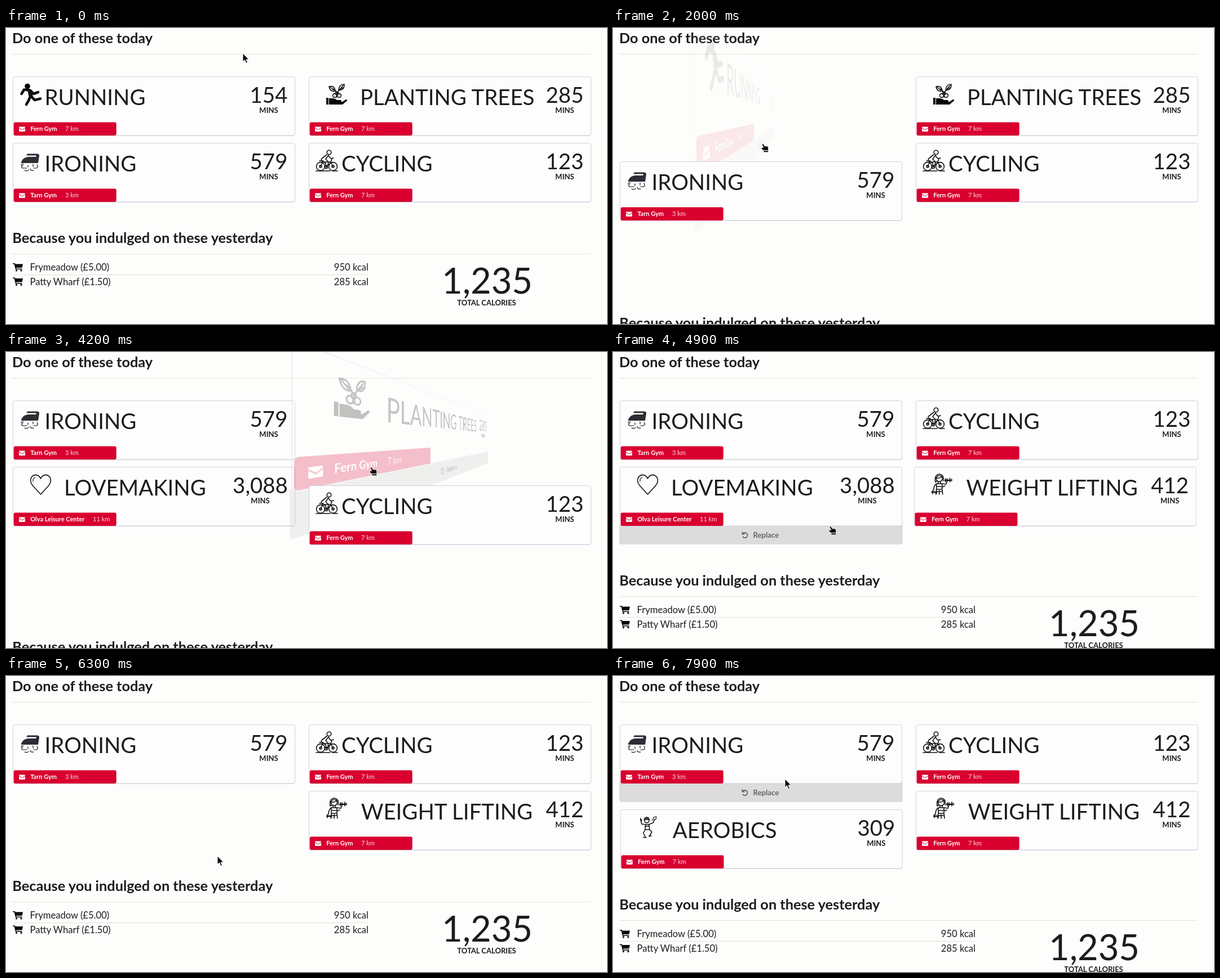
An HTML page for the animation above (8 s loop, 1066 by 526 pixels).

```html
<!DOCTYPE html>
<html lang="en">
<head>
<meta charset="utf-8">
<title>Activities</title>
<style>
html, body { margin: 0; width: 100%; height: 100%; overflow: hidden; background: #fdfdfc; }
#stage { position: absolute; left: 0; top: 0; width: 1066px; height: 526px; overflow: hidden; }
svg { position: absolute; overflow: visible; font-family: Lato, sans-serif; fill: #1b1c1d; }
.card { width: 501px; height: 138px; transform-origin: 250.5px 69px; }
.bold { font-weight: 700; }
.mid { text-anchor: middle; }
.h { font-size: 25.3px; font-weight: 700; }
.big { font-size: 38.4px; }
.row { font-size: 16.6px; }
.label { font-size: 13px; font-weight: 700; text-anchor: middle; }
.rule { stroke: #e2e2d8; }
.ink { fill: none; stroke: #111; stroke-width: 1.6; stroke-linecap: round; stroke-linejoin: round; }
.thin { stroke-width: 1.2; }
.limb { stroke-width: 4.6; }
.solid { fill: #050505; }
</style>
</head>
<body>
<div id="stage">
  <svg width="1066" height="60">
    <text class="h" x="11" y="27">Do one of these today</text>
    <path class="rule" d="M12 46.5H1037"/>
  </svg>
  <svg id="food" width="1066" height="526">
    <text class="h" x="11.3" y="382">Because you indulged on these yesterday</text>
    <path class="rule" d="M12 401.5H1037M12 438.5H643"/>
    <text class="mid" x="853.5" y="472" font-size="63.2">1,235</text>
    <text class="label" x="852.5" y="493">TOTAL CALORIES</text>
  </svg>
</div>
<script>
const LOOP = 8000, FLIP = 750, ENTER = 1000;
const TOP = 86, PITCH = 117.5, BUTTON = 33;
const stage = document.getElementById('stage');
const food = document.getElementById('food');

const icons = {
  run: `<circle class="solid" cx="26" cy="17.5" r="4.8"/>
    <g class="ink limb">
      <path d="M30 26L32 35" style="stroke-width:7"/>
      <path d="M29 24.5L20 23.5L15.5 31M31 25L37 31L45 28"/>
      <path d="M33 36L39 42L49 39.500M31 36L28 43L24 50"/></g>`,
  iron: `<path fill="#2d2d35" fill-rule="evenodd"
      d="M15 34Q18 26 27 25H41L42 22.5H24L26 19.5H43Q47 19.5 47 23L45 36H15Z"/>
    <path class="ink thin" d="M15 40Q15 37 19 38M17 45Q14 42 18 40M18 45H25M27 40V43M36 38V42M43 39Q46 43 42 45H37M21 49Q26 51 28 48M31 46Q31 50 37 49"/>`,
  plant: `<path class="ink" d="M50 37V31Q49 25 43 22M50 31Q52 24 61 20M36 18Q46 16 47 26Q38 28 36 18ZM63 14Q54 14 53 24Q63 26 63 14Z"/>
    <path class="ink" d="M38 19L45 25M61 16L55 23"/>
    <g class="ink"><circle cx="46" cy="34" r="3.4"/><circle cx="54" cy="34" r="3.4"/><circle cx="50" cy="30" r="2.6"/></g>
    <path class="solid" d="M31 38H35V50H31ZM36 39H43Q47 39 50 42H57Q59 44 57 45H60L66 41Q69 41 68 43L60 50H36Z"/>`,
  cycle: `<g class="ink"><circle cx="21" cy="42" r="7.4"/><circle cx="43" cy="42" r="7.4"/><circle cx="36" cy="17" r="3.8"/>
      <circle cx="31" cy="43" r="2.5"/><circle cx="21" cy="42" r="2"/><circle cx="43" cy="42" r="2"/>
      <path d="M32 21L23 28Q21 31 24 33L30 36L31 43M35 22L30 29L35 34L33 43M35 23L39 28L44 27M21 42L25 34H39L43 42M39 34L41 29M31 43L39 35M19 32H26M13 50H38M42 50H51"/></g>`,
  heart: `<path class="ink" d="M49.500 49L35 33Q29 25 33.500 18Q38 13 44 15Q48 17 49.500 21Q51 17 55 15Q61 13 65.500 18Q70 25 64 33Z"/>
    <path class="ink thin" d="M36 26Q35 20 40 19"/>`,
  lift: `<g class="ink"><circle cx="45" cy="21" r="5.5"/>
      <path d="M38 27Q36 14 45 13Q54 14 52 25M39 20Q46 21 50 17M38 27L41 25M43 27V30M47 27V30"/>
      <path d="M40 30H50L57 31L59 25M50 30V40H40V30Q35 33 35 42M40 35H50M55 34L50 36M40 40L39 49M45 42V49M50 40L51 49M40 44H50"/>
      <path d="M55 24H65M32 45H40" style="stroke-width:2.500"/>
      <path d="M56 21V27M59 21V26M64 20V27M67 22V25M33 42V48M40 43V48"/></g>`,
  dance: `<g class="ink"><circle cx="47" cy="20" r="4"/>
      <path d="M42 18H52M43 16Q47 12 51 16M36 18L38 26L45 27H50L58 24L61 18M45 27L44 36H52L51 27M44 30H51M44 36L41 42L45 50M52 36L56 40L52 47M41 50H46M51 48L55 47M36 16L38 20"/>
      <path class="thin" d="M58 19L59 14L64 13L63 18M58 19H56M63 18H61"/></g>`
};

const near = ['Fern Gym', '7 km', 93];
// add: slot appears, enter: slides in, flip: leaves, hover: button shown, dark: pointer on button
const cards = [
  { name: 'RUNNING', icon: 'run', tx: 56.6, mins: '154', gym: near, side: 0, flip: 1434, hover: 1050, dark: 1330 },
  { name: 'IRONING', icon: 'iron', tx: 56.6, mins: '579', gym: ['Tarn Gym', '3 km', 93], side: 0, hover: 7800 },
  { name: 'LOVEMAKING', icon: 'heart', tx: 91, mins: '3,088', nx: 439, gym: ['Olva Leisure Center', '11 km', 142],
    side: 0, add: 1434, enter: 2385, flip: 5450, hover: 4640, dark: 4910 },
  { name: 'AEROBICS', icon: 'dance', tx: 93, mins: '309', gym: near, side: 0, add: 5450, enter: 6957 },
  { name: 'PLANTING TREES', icon: 'plant', tx: 91, mins: '285', gym: near, side: 1, flip: 3736, hover: 2850, dark: 3130 },
  { name: 'CYCLING', icon: 'cycle', tx: 58, mins: '123', gym: near, side: 1 },
  { name: 'WEIGHT LIFTING', icon: 'lift', tx: 92.7, mins: '412', gym: near, side: 1, add: 3736, enter: 4387 }
];

function makeSvg(cls, html) {
  const el = document.createElementNS('http://www.w3.org/2000/svg', 'svg');
  el.setAttribute('class', cls);
  el.innerHTML = html;
  stage.append(el);
  return el;
}

function cardMarkup({ name, icon, tx, mins, nx = 454, gym }) {
  return `<g class="button"><rect x="-1" y="101" width="503" height="37" rx="4"/>
      <path d="M218.500 118.500A4.600 4.600 0 1 1 218 124M217.500 115.500V119.500H221.500" fill="none" stroke="currentColor" stroke-width="1.800"/>
      <text class="bold" x="236.500" y="126" font-size="13.200" fill="currentColor">Replace</text></g>
    <rect x=".5" y="1" width="500" height="105" rx="4" fill="#d6d6e4"/>
    <rect x=".5" y=".5" width="500" height="104.500" rx="4" fill="#fdfdfd" stroke="#d0d0e0"/>
    ${icons[icon]}
    <text class="big" x="${tx}" y="50.700">${name}</text>
    <text class="big mid" x="${nx}" y="46.700">${mins}</text>
    <text class="label" x="${nx}" y="65">MINS</text>
    <rect x="1.700" y="81.400" width="182" height="23.500" rx="3" fill="#d9002f"/>
    <rect x="11" y="89.500" width="11" height="8.500" rx="1" fill="#fff"/>
    <path d="M11 91.500L16.500 95L22 91.500" fill="none" stroke="#d9002f"/>
    <g font-size="11" style="fill:#fff"><text class="bold" x="31.200" y="97">${gym[0]}</text>
      <text x="${gym[2]}" y="97" opacity=".85">${gym[1]}</text></g>`;
}

function track(el, frames, options) {
  const anim = el.animate(frames, options);
  anim.pause();
  return anim;
}

function slideIn(card) {
  const dir = card.side ? 1 : -1;
  const steps = [[0, 3000], [.6, -25], [.75, 10], [.9, -5], [1, 0]];
  return track(card.el, steps.map(([offset, x]) => ({
    offset, transform: `translateX(${x * dir}px)`, opacity: offset ? 1 : 0,
    easing: 'cubic-bezier(.215,.61,.355,1)'
  })), { delay: card.enter, duration: ENTER, fill: 'both' });
}

function flipOut(card) {
  const steps = [[0, 0, 1], [.3, -15, 1], [1, 90, 0]];
  return track(card.el, steps.map(([offset, angle, opacity]) => ({
    offset, opacity, transform: `perspective(367px) rotateY(${angle}deg)`, easing: 'ease'
  })), { delay: card.flip, duration: FLIP, fill: 'forwards' });
}

for (const card of cards) {
  card.el = makeSvg('card', cardMarkup(card));
  card.el.style.left = (card.side ? 537 : 12) + 'px';
  card.button = card.el.querySelector('.button');
  card.end = card.flip ? card.flip + FLIP : LOOP;
  card.anims = [];
  if (card.enter) card.anims.push(slideIn(card));
  if (card.flip) card.anims.push(flipOut(card));
}

const cart = y => `<path class="solid" d="M12 ${y}H16L16.500 ${y + 1.5}H30L28.500 ${y + 8}H18L18.300 ${y + 9.500}H28.500V${y + 11}H17L14.500 ${y + 1.5}H12Z"/>
  <circle cx="18.500" cy="${y + 13}" r="1.700"/><circle cx="27" cy="${y + 13}" r="1.700"/>`;
const meals = [['Frymeadow (£5.00)', '950 kcal'], ['Patty Wharf (£1.50)', '285 kcal']];
food.insertAdjacentHTML('beforeend', meals.map(([name, kcal], i) => {
  const y = 431 + i * 25.5;
  return `${cart(y - 13)}<text class="row" x="42.500" y="${y}">${name}</text>
    <text class="row" x="643" y="${y}" text-anchor="end">${kcal}</text>`;
}).join(''));

const arrow = makeSvg('cursor', '<path d="M0 0V15L3.500 11.800L6 17.500L8.500 16.400L6 11H10.800Z" fill="#0a0a0a" stroke="#fff"/>');
const hand = makeSvg('cursor', `<g fill="#0a0a0a" stroke="#fff" stroke-width=".6">
  <path d="M-1.500 1Q-1 -1 1 .5L3 4H7Q9.500 4.500 9.500 7V11.500H1L-2.500 9Q-3.500 7 -1.500 6.500H.8Z"/>
  <rect x="1" y="12" width="8.500" height="2.800"/></g>`);

const path = [
  [0, 420, 45], [500, 420, 45], [1000, 385, 84], [1300, 290, 188], [1420, 266, 206],
  [2350, 266, 206], [2700, 480, 180], [2900, 600, 172], [3150, 648, 205], [4500, 648, 205],
  [4640, 511, 236], [4900, 386, 310], [5700, 386, 310], [6250, 375, 320], [7350, 375, 320],
  [7800, 312, 192], [7900, 305, 183], [8000, 300, 178]
];

function pointer(t) {
  const i = path.findIndex(p => p[0] > t);
  const [t0, x0, y0] = path[i - 1], [t1, x1, y1] = path[i];
  const k = (t - t0) / (t1 - t0);
  return [x0 + (x1 - x0) * k, y0 + (y1 - y0) * k];
}

function draw(now) {
  const t = now % LOOP;
  const bottom = [TOP, TOP];
  let pressing = false;
  for (const card of cards) {
    const present = t >= (card.add || 0) && t < card.end;
    const hovered = present && t >= card.hover;
    card.el.style.visibility = present ? 'visible' : 'hidden';
    card.anims.forEach(a => { a.currentTime = t; });
    if (!present) continue;
    const dark = Math.min(1, Math.max(0, (t - card.dark) / 100 || 0));
    pressing = pressing || t >= card.dark - 50;
    const grey = 220 - 24 * dark;
    card.button.style.display = hovered ? '' : 'none';
    card.button.style.fill = `rgb(${grey},${grey},${grey + 1})`;
    card.button.style.color = dark > .5 ? '#303133' : '#646567';
    card.el.style.top = bottom[card.side] + 'px';
    bottom[card.side] += PITCH + (hovered ? BUTTON : 0);
  }
  food.style.top = Math.max(...bottom) - TOP - 2 * PITCH + 'px';
  const [x, y] = pointer(t);
  for (const el of [arrow, hand]) {
    el.style.left = x + 'px';
    el.style.top = y + 'px';
  }
  arrow.style.display = pressing ? 'none' : '';
  hand.style.display = pressing ? '' : 'none';
}

const start = performance.now();
function tick() {
  draw(performance.now() - start);
  requestAnimationFrame(tick);
}
tick();
</script>
</body>
</html>
```
